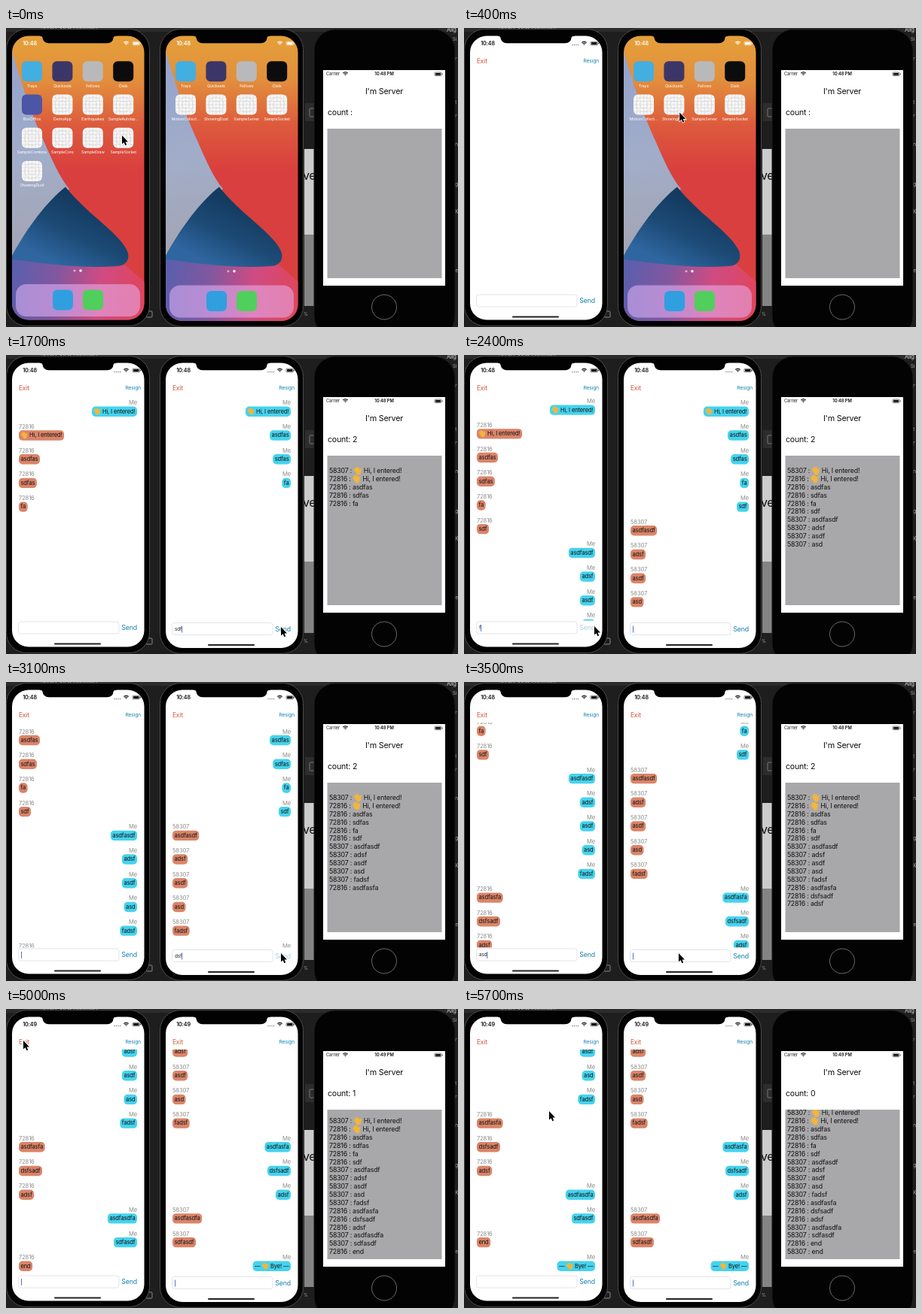
Animation of 600x398 px, one loop 5.8 s. Source, as an HTML page with a canvas:

```html
<!DOCTYPE html>
<html lang="en">
<head>
<meta charset="utf-8">
<title>Socket chat</title>
<style>
html, body { margin: 0; width: 100%; height: 100%; overflow: hidden; background: #1e1e1e; }
canvas { display: block; }
</style>
</head>
<body>
<canvas id="stage" width="600" height="398"></canvas>
<script>
const c = document.getElementById('stage').getContext('2d');
const LOOP = 5800, STEP = 100, PITCH = 31.7;
const IDS = ['58307', '72816'];
const WAVE = '~';                       // stands for the drawn hand in strings
const HI = WAVE + ' Hi, I entered!', BYE = '— ' + WAVE + ' Bye! —';

// [time, sender, text]
const events = [
  [450, 0, HI], [800, 1, HI],
  [1200, 1, 'asdfas'], [1400, 1, 'sdfas'], [1560, 1, 'fa'], [1740, 1, 'sdf'],
  [2000, 0, 'asdfasdf'], [2140, 0, 'adsf'], [2250, 0, 'asdf'], [2368, 0, 'asd'], [2550, 0, 'fadsf'],
  [3040, 1, 'asdfasfa'], [3210, 1, 'dsfsadf'], [3400, 1, 'adsf'],
  [3640, 0, 'asdfasdfa'], [3790, 0, 'sdfasdf'],
  [4400, 1, 'end'], [5200, 0, 'end']
];

const stock = ['Trays', 'Quicksets', 'Fellows', 'Dials'];
const phones = [
  { x: 0, low: 0, open: 200, focus: 1850, blur: 5200, blink: 600, icon: [155.5, 145.5],
    apps: [...stock, 'BoxOffice', 'DemoApp', 'Earthquakes', 'SampleAutolay…',
           'SampleCombine', 'SampleCore', 'SampleDraw', 'SampleSocket', 'ShowingDust'] },
  { x: 204, low: 1.5, open: 600, focus: 900, blur: LOOP, blink: 0, icon: [155.5, 101.5],
    apps: [...stock, 'MotionCollect…', 'ShowingDust', 'SampleServer', 'SampleSocket'] }
];
const iconColor = { Trays: '#43aee0', Quicksets: '#3c3668', Fellows: '#b9b9bb', Dials: '#0c0c0e', BoxOffice: '#4d55a5' };

// [time, x, y] of the pointer tip
const pointer = [
  [0, 154, 143], [250, 154, 143], [500, 358, 96], [650, 358, 96], [900, 303, 359],
  [1150, 365, 362], [1750, 365, 362], [1850, 82, 363], [2000, 173, 361], [2600, 173, 361],
  [2800, 290, 364], [3000, 365, 361], [3420, 365, 361], [3600, 173, 361], [3800, 173, 361],
  [3900, 253, 268], [4200, 227, 43], [4500, 227, 43], [5000, 23, 42], [5250, 23, 42], [5700, 113, 136]
];

const clamp = v => Math.max(0, Math.min(1, v));
const ease = v => (v = clamp(v), v * v * (3 - 2 * v));
const lerp = (a, b, p) => a + (b - a) * p;

function box(x, y, w, h, r, fill, stroke, width = 1) {
  c.beginPath();
  c.roundRect(x, y, w, h, r);
  if (fill) { c.fillStyle = fill; c.fill(); }
  if (stroke) { c.strokeStyle = stroke; c.lineWidth = width; c.stroke(); }
}

function shape(d, fill) {
  c.fillStyle = fill;
  c.fill(new Path2D(d));
}

function dot(x, y, r, fill) {
  c.fillStyle = fill;
  c.beginPath();
  c.arc(x, y, r, 0, 7);
  c.fill();
}

function gradient(x0, y0, x1, y1, ...colors) {
  const g = c.createLinearGradient(x0, y0, x1, y1);
  colors.forEach((k, i) => g.addColorStop(i / (colors.length - 1), k));
  return g;
}

function setFont(size, weight = 400) {
  c.font = `${weight} ${size}px Inter, "Liberation Sans", sans-serif`;
  c.letterSpacing = -size * 0.02 + 'px';
}

function text(s, x, y, size, color, align = 'left', weight) {
  setFont(size, weight);
  c.textBaseline = 'middle';
  c.textAlign = align;
  c.fillStyle = color;
  c.fillText(s, x, y);
}

function hand(x, y, size) {
  c.save();
  c.translate(x, y);
  c.scale(size / 10, size / 10);
  c.rotate(-0.55);
  c.lineCap = 'round';
  c.strokeStyle = '#f3b53c';
  c.lineWidth = 1.6;
  c.beginPath();
  for (let i = 0; i < 4; i++) {
    c.moveTo(-1.9 + i * 1.5, 1);
    c.lineTo(-2.6 + i * 1.7, i % 3 ? -4.4 : -3.2);
  }
  c.moveTo(1.8, 2.6);
  c.lineTo(4.6, -0.2);
  c.stroke();
  box(-2.8, -0.8, 5.6, 5.4, 2.4, '#f3b53c');
  c.restore();
}

function richWidth(s, size) {
  setFont(size);
  return s.split(WAVE).reduce((w, part, i) => w + c.measureText(part).width + (i ? size * 1.25 : 0), 0);
}

function rich(s, x, y, size) {
  s.split(WAVE).forEach((part, i) => {
    if (i) {
      hand(x + size * 0.6, y, size * 1.25);
      x += size * 1.25;
    }
    text(part, x, y, size, '#111');
    x += c.measureText(part).width;
  });
}

function wifi(x, y, color) {
  c.strokeStyle = color;
  c.lineWidth = 1.1;
  c.lineCap = 'butt';
  for (const r of [1.2, 3, 4.8]) {
    c.beginPath();
    c.arc(x, y + 2.6, r, -2.3, -0.84);
    c.stroke();
  }
}

function battery(x, y, w, color) {
  box(x, y - 2.3, w, 4.6, 1.4, null, color, 0.6);
  box(x + 1, y - 1.4, w - 2, 2.8, 0.7, color);
  box(x + w + 0.7, y - 0.8, 0.9, 1.6, 0.4, color);
}

function desktop() {
  c.fillStyle = '#1e1e1e';
  c.fillRect(0, 0, 600, 398);
  c.fillStyle = '#2b2b2b';
  c.fillRect(0, 0, 600, 5);
  text('Server View Controller', 46, 0, 7.5, '#aaa');
  box(397, 100, 14, 24, 0, '#2d2d2d');
  box(403, 107, 9, 11, 1, null, '#777');
  box(396, 161, 14, 114, 0, '#cbcbcb');
  box(396, 275, 14, 95, 0, '#848484');
  text('ve', 394, 197.5, 16, '#111');
  text('%', 395, 381, 6, '#999');
  box(186, 377, 8, 8, 1, null, '#888');
  text('Alig', 585, 3, 7.5, '#ccc');
  text('Si', 593, 15, 6, '#aaa');
  ['r', 't', 'r', 'n', 'g', 'K', 'e'].forEach((k, i) => text(k, 596, [41, 99, 117, 155, 208, 245, 323][i], 7, '#aaa'));
}

function icon(name, x, y) {
  const plain = iconColor[name];
  box(x - 13.5, y - 13.5, 27, 27, 6, plain || '#f8f8f8');
  if (plain) return;
  c.strokeStyle = '#d3d3d6';
  c.lineWidth = 0.6;
  c.beginPath();
  for (let k = -9; k <= 9; k += 4.5) {
    c.moveTo(x + k, y - 13);
    c.lineTo(x + k, y + 13);
    c.moveTo(x - 13, y + k);
    c.lineTo(x + 13, y + k);
  }
  for (const r of [5, 10]) {
    c.moveTo(x + r, y);
    c.arc(x, y, r, 0, 7);
  }
  c.stroke();
}

function home(p) {
  c.fillStyle = gradient(0, 10, 0, 190, '#e5a03a', '#e28e3c', '#dd5a3d', '#d93f3e');
  c.fillRect(8, 8, 178, 385);
  shape('M8 32C20 70 32 112 50 150C62 178 72 200 84 214L8 312Z', gradient(8, 60, 40, 300, '#96a4cc', '#a2adc8', '#a3a4b2'));
  shape('M8 304C60 312 110 318 158 315L186 340V393H8Z', gradient(8, 330, 183, 350, '#5a5fae', '#81579f', '#cf4b82', '#e0455d'));
  shape('M8 303C28 266 55 230 79 211.500C106 246 146 270 159 293C167 306 160 317 147 317C100 321 50 313 8 308Z',
    gradient(120, 240, 80, 320, '#133a5f', '#1c4a75', '#2f66a0'));
  p.apps.forEach((name, i) => {
    const x = 34.5 + i % 4 * 40.4, y = 57.8 + (i >> 2) * 44.2;
    icon(name, x, y);
    text(name, x, y + 19.3, 5.3, '#fff', 'center');
  });
  dot(91, 323 + p.low / 2, 1.6, '#ffffff88');
  dot(99, 323 + p.low / 2, 1.7, '#fff');
  box(13, 341 + p.low, 165, 43, 14, gradient(13, 0, 178, 0, '#a98ed6', '#b98cd3', '#de84bd', '#e27fae'));
  box(62, 348.5 + p.low, 27, 27, 6, '#2f9fe0');
  box(102, 348.5 + p.low, 27, 27, 6, '#50cf5c');
}

// Messages one phone has on its list at time t
function listFor(i, t) {
  const own = events.filter(e => e[1] === i);
  const enter = own[0][0], exit = own[own.length - 1][0];
  return events.filter(([at]) => at <= t && at >= enter && at <= exit);
}

function messages(i, t) {
  const list = listFor(i, t), n = list.length;
  if (!n) return;
  const target = k => Math.max(0, PITCH * (k - 1) - 267);
  const scroll = lerp(target(n - 1), target(n), ease((t - list[n - 1][0]) / 150));
  c.save();
  c.beginPath();
  c.rect(8, 54, 178, 299.5);
  c.clip();
  list.forEach(([, who, msg], k) => {
    const mine = who === i, y = 64 + k * PITCH - scroll;
    const body = mine && msg === 'end' ? BYE : msg;
    const w = richWidth(body, 7.6) + 5, x = mine ? 174 - w : 17;
    text(mine ? 'Me' : IDS[who], mine ? 174 : 17, y, 7.6, '#8c8c8c', mine ? 'right' : 'left');
    box(x, y + 4.6, w, 13.4, 4.8, mine ? '#45d3ee' : '#db8469');
    rich(body, x + 2.5, y + 11.4, 7.6);
  });
  c.restore();
}

function draft(i, t) {
  const typed = events.filter(e => e[1] === i && e[2] !== 'end' && e[2] !== HI);
  const k = typed.findIndex(e => e[0] > t);
  if (k < 0) return '';
  const [at, , msg] = typed[k];
  const from = Math.max(at - 200, k ? typed[k - 1][0] : 0);
  return msg.slice(0, Math.ceil(clamp((t - from) / (at - from)) * msg.length));
}

function chat(p, i, t) {
  c.fillStyle = '#fff';
  c.fillRect(7, 8, 180, 386);
  for (let k = 0; k < 4; k++) dot(144 + k * 2.5, 22.5, 0.7, '#1119');
  messages(i, t);
  text('Exit', 17, 44.5, 8.4, '#cf5537');
  text('Resign', 179, 43.5, 6.7, '#1482b0', 'right');
  const y = 363 + p.low, sent = events.some(e => e[1] === i && e[2] !== HI && e[2] !== 'end' && t >= e[0] && t - e[0] < 100);
  box(16.5, y - 8, 133.5, 16, 3, '#fff', '#dedee2', 0.8);
  text('Send', 174, y + 0.5, 8.8, sent ? '#a9d3e6' : '#1482b0', 'right');
  const word = draft(i, t);
  text(word, 20, y + 0.5, 6.4, '#222');
  if (t >= p.focus && t < p.blur && (word || (t + p.blink) % 700 < 400)) {
    box(20 + c.measureText(word).width, y - 4, 0.9, 9, 0, '#4a5fd0');
  }
  box(64, 383.5 + p.low, 62, 2, 1, '#222');
}

function phone(p, i, t, clock) {
  c.save();
  c.translate(p.x, 0);
  box(0.5, 1.5, 190, 395 + p.low / 2, 27, '#020202', '#4b4b4b');
  c.save();
  c.beginPath();
  c.roundRect(8, 10.5, 175.5, 378 + p.low, 22);
  c.clip();
  const q = ease((t - p.open) / 200);
  if (q < 1) home(p);
  if (q === 1) chat(p, i, t);
  else if (q > 0) {
    const [x, y] = p.icon;
    box(lerp(x - 13.5, 8, q), lerp(y - 13.5, 10, q), lerp(27, 176, q), lerp(27, 381, q), lerp(6, 18, q), '#fff');
  }
  const ink = q > 0.7 ? '#111' : '#fff';
  text(clock, 31.5, 20.8, 7.2, ink, 'center', 600);
  wifi(159.5, 20.5, ink);
  battery(168, 20.5, 9.5, ink);
  c.restore();
  shape('M45 9V10.500Q48 10.500 48.500 13Q49.500 20.200 57 20.200H134Q142 20.200 142.500 13Q143 10.500 147 10.500V9Z', '#020202');
  c.restore();
}

function server(t, clock) {
  box(409, 2, 187, 410, 28, '#030303', '#1c1c1c');
  box(421, 56, 162, 287, 0, '#fff');
  text('Carrier', 425, 61.5, 5.8, '#222');
  wifi(450.5, 61, '#222');
  text(clock + ' PM', 502, 61.5, 5.8, '#111', 'center', 600);
  battery(569, 61.3, 9, '#111');
  text("I'm Server", 502, 84.3, 10.8, '#111', 'center');
  const log = events.filter(e => e[0] <= t);
  const count = log.reduce((n, e) => n + (e[2] === HI) - (e[2] === 'end'), 0);
  text(log.length ? 'count: ' + count : 'count :', 427, 112.8, 10.6, '#111');
  c.save();
  box(426.5, 134, 152, 199, 0, '#a8a8aa');
  c.clip();
  const line = 10.87, scroll = Math.max(0, 154.5 + line * (log.length - 1) - 323.5);
  log.forEach(([, who, msg], k) => rich(IDS[who] + ' : ' + msg, 429, 154.5 + k * line - scroll, 8.8));
  c.restore();
  c.strokeStyle = '#777';
  c.lineWidth = 0.9;
  c.beginPath();
  c.arc(502, 371.5, 16.5, 0, 7);
  c.stroke();
}

function arrow(t) {
  let k = pointer.findIndex(s => s[0] > t);
  if (k < 0) k = pointer.length - 1;
  const a = pointer[k - 1], b = pointer[k], p = ease((t - a[0]) / (b[0] - a[0]));
  c.save();
  c.translate(lerp(a[1], b[1], p), lerp(a[2], b[2], p));
  const tip = new Path2D('M0 0V11.500L2.600 9.200L4.400 13.200L6.200 12.400L4.500 8.500H8Z');
  c.strokeStyle = '#fff';
  c.lineWidth = 1.4;
  c.stroke(tip);
  c.fillStyle = '#000';
  c.fill(tip);
  c.restore();
}

let start;
function frame(now) {
  start ??= now;
  const t = Math.floor((now - start) % LOOP / STEP) * STEP;
  const clock = t < 3700 ? '10:48' : '10:49';
  desktop();
  phones.forEach((p, i) => phone(p, i, t, clock));
  server(t, clock);
  arrow(t);
  requestAnimationFrame(frame);
}
requestAnimationFrame(frame);
</script>
</body>
</html>
```
